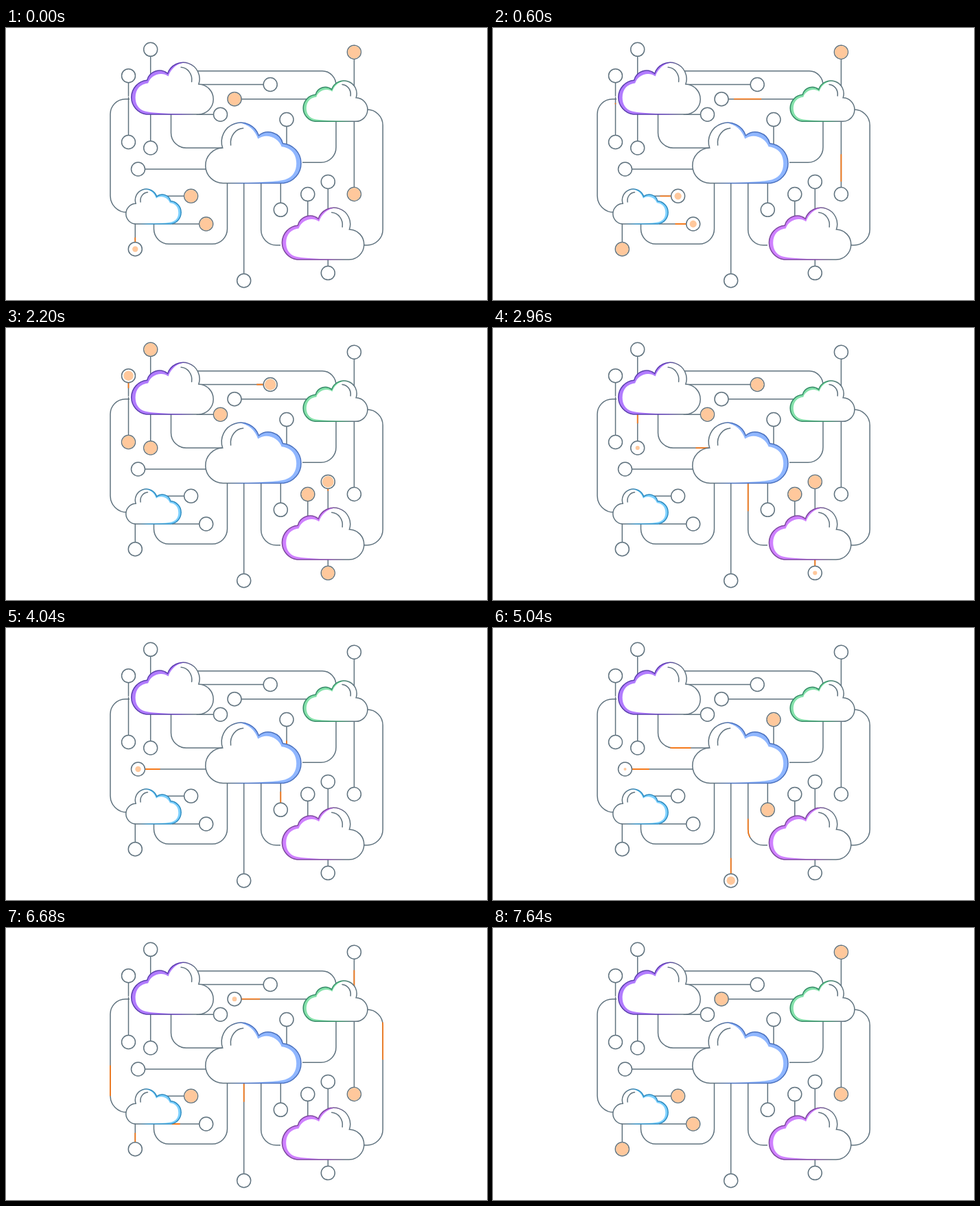
Animation, 701 px wide and 397 px high, one loop 7.68 s. Source, as an HTML page:

```html
<!DOCTYPE html>
<html lang="en">
<head>
<meta charset="utf-8">
<title>Connected clouds</title>
<style>
  html, body { margin: 0; width: 100%; height: 100%; overflow: hidden; background: #fff; }
  svg { display: block; width: 701px; height: 397px; }
  path, circle { fill: none; stroke: #60737f; stroke-width: 1.5; }
  .pulse { stroke: #f5791a; stroke-width: 1.8; }
  .dot { fill: #ffc89c; stroke: none; }
  .flat { stroke: none; }
  .edge { vector-effect: non-scaling-stroke; }
</style>
</head>
<body>
<svg viewBox="0 0 701 397"><defs></defs><g id="lines"></g><g id="pulses"></g><g id="clouds"></g><g id="nodes"></g></svg>
<script>
const LOOP = 7680;
const GROW = 225;    // time for a dot to fill or empty
const SPEED = 0.16;  // px per ms of a returning pulse
const RING = 10;

const layer = id => document.getElementById(id);
const defs = document.querySelector('defs');

function add(parent, tag, attrs) {
  const el = document.createElementNS('http://www.w3.org/2000/svg', tag);
  for (const k in attrs) el.setAttribute(k, attrs[k]);
  parent.appendChild(el);
  return el;
}

const clamp = v => Math.max(0, Math.min(1, v));
const easeOut = p => 1 - (1 - p) * (1 - p);
const easeBoth = p => p < 0.5 ? 2 * p * p : 1 - 2 * (1 - p) * (1 - p);

// Clouds: one shape, scaled and mirrored
const CLOUD = 'M25 76.5A25 25 0 0 1 26 26.8A18.6 18.6 0 0 1 56 17' +
  'A23.6 23.6 0 0 1 101.2 32.5A22 22 0 0 1 100 76.5Z';
const LIGHT = 'M9 52C9 39 17 32 27.5 31C31 20 46 13 57 21C61 10 69 2 84 .3L124 0V78H106' +
  'C62 75.5 34 75 23 72C13 69 9 61 9 52Z';
const SHINE = 'M75.5 7.8C85 8.5 92.5 17.5 91 29';

add(add(defs, 'clipPath', { id: 'inside' }), 'path', { d: CLOUD });

function cloud(x, y, scale, flip, fill, dark) {
  const id = 'edge' + x;
  const grad = add(defs, 'linearGradient', { id });
  add(grad, 'stop', { offset: 0.58, 'stop-color': dark });
  add(grad, 'stop', { offset: 0.78, 'stop-color': '#60737f' });
  const g = add(layer('clouds'), 'g', {
    transform: `translate(${x} ${y}) scale(${flip ? -scale : scale} ${scale})`
  });
  add(g, 'path', { d: CLOUD, class: 'flat', style: 'fill:' + fill });
  add(g, 'path', { d: LIGHT, class: 'flat', style: 'fill:#fff', 'clip-path': 'url(#inside)' });
  add(g, 'path', { d: CLOUD, class: 'edge', style: `stroke:url(#${id})` });
  add(g, 'path', { d: SHINE, class: 'edge', 'stroke-linecap': 'round' });
}

cloud(179.6, 49.5, 1, false, '#b17bff', '#5b3fae');
cloud(430.7, 76.3, 0.785, false, '#84e1aa', '#348a66');
cloud(433.7, 137.2, 1.166, true, '#8fb6ff', '#4b72bf');
cloud(257.3, 234.5, 0.673, true, '#7dd0ff', '#2e8cc0');
cloud(399.2, 261.5, 1, false, '#cf80ff', '#7d479f');

function pulse(d) {
  const el = add(layer('pulses'), 'path', { d, class: 'pulse' });
  const length = el.getTotalLength();
  return {
    length,
    show(from, to) {
      from = Math.max(0, from);
      to = Math.min(length, to);
      const on = to - from > 0.05;
      el.style.display = on ? '' : 'none';
      if (on) el.setAttribute('stroke-dasharray', `0 ${from} ${to - from} 9999`);
    }
  };
}

// Links between clouds; each run is [start, duration, lag of the tail, backwards]
const links = [
  { d: 'M481 84A20 21 0 0 0 461 62.7H278', runs: [[606, 731, 190]] },
  { d: 'M526 119A23 23 0 0 1 549.2 142V294A23 23 0 0 1 526 317H520',
    runs: [[676, 731, 144], [6120, 760, 130, true]] },
  { d: 'M176 269A24 24 0 0 1 152 245V126A22 22 0 0 1 174 103.8H180',
    runs: [[560, 810, 81], [6120, 810, 120, true]] },
  { d: 'M240.5 126V153A22 22 0 0 0 262.5 175H320',
    runs: [[2299, 800, 120], [4632, 800, 116, true]] },
  { d: 'M400 317H394A22.5 22.5 0 0 1 371.7 294V225',
    runs: [[2182, 800, 330], [4534, 800, 113, true]] },
  { d: 'M432 196.3H459A22 22 0 0 0 481 174V136', runs: [] },
  { d: 'M322.5 225V293A22 22 0 0 1 300 315.3H238A22 22 0 0 1 215.5 293V286', runs: [] }
];

for (const link of links) {
  add(layer('lines'), 'path', { d: link.d });
  link.pulse = pulse(link.d);
}

function drawLink({ pulse, runs }, t) {
  const run = runs.find(([start, dur, lag]) => t >= start && t < start + dur + lag);
  if (!run) return pulse.show(0, 0);
  const [start, dur, lag, back] = run;
  const len = pulse.length;
  const head = len * easeBoth(clamp((t - start) / dur));
  const tail = len * easeBoth(clamp((t - start - lag) / dur));
  back ? pulse.show(len - head, len - tail) : pulse.show(tail, head);
}

// Spokes: centre of the ring, direction and distance to the cloud, fill and empty times.
// tail: start of the outgoing tail, back: start of the return (both relative)
const DIR = { L: [-1, 0], R: [1, 0], U: [0, -1], D: [0, 1] };
const spokes = [];

function spoke(x, y, dir, reach, on, off, { tail = -200, back = 0, again } = {}) {
  const [dx, dy] = DIR[dir];
  const d = `M${x + dx * RING} ${y + dy * RING}L${x + dx * reach} ${y + dy * reach}`;
  add(layer('lines'), 'path', { d });
  const ring = add(layer('nodes'), 'circle', { cx: x, cy: y, r: RING, style: 'fill:#fff' });
  const dot = add(layer('nodes'), 'circle', { cx: x, cy: y, r: 0, class: 'dot' });
  const spans = on > off ? [[-LOOP, off], [on, 2 * LOOP]] : [[on, off]];
  if (again) spans.push([again, 2 * LOOP]);
  spokes.push({ pulse: pulse(d), ring, dot, spans, tail, back });
}

// upper violet
spoke(178.5, 69.7, 'D', 30, 1750, 2150);
spoke(178.5, 166.5, 'U', 66, 1050, 2210, { tail: -500 });
spoke(210.7, 31.3, 'D', 38, 1720, 2480);
spoke(210.7, 175, 'U', 49, 1800, 2810, { back: -260 });
spoke(385.2, 82.5, 'L', 100, 2000, 3250, { back: -50 });
spoke(312.5, 126.2, 'L', 35, 1900, 3050);
// green
spoke(507.4, 35.2, 'D', 50, 7000, 700, { back: 31 });
spoke(507.4, 242.5, 'U', 106, 6251, 300, { tail: -438 });
spoke(333, 103.7, 'R', 106, 6600, 300);
// small blue
spoke(269.6, 245.3, 'L', 38, 6240, 500, { tail: -327 });
spoke(291.7, 286, 'L', 50, 7100, 500);
spoke(188.3, 322.7, 'U', 38, -100, 700, { again: 6700 });
// middle
spoke(192.5, 206, 'R', 99, 3940, 4865, { back: 19 });
spoke(346.7, 368.7, 'U', 143, 4890, 5815, { back: -40 });
spoke(400.3, 265.3, 'U', 39, 4093, 5630);
spoke(409, 133.6, 'D', 36, 4490, 5760);
// lower violet
spoke(439.8, 242.6, 'D', 36, 1900, 3100);
spoke(469.3, 224.4, 'D', 40, 2000, 3250);
spoke(469.3, 357.6, 'U', 20, 1800, 2810);

function drawSpoke({ pulse, dot, spans, tail, back }, t) {
  const len = pulse.length;
  let size = 0, from = 0, to = 0;
  for (const [on, off] of spans) {
    size = Math.max(size, Math.min(clamp((t - on) / GROW), clamp((off + GROW - t) / GROW)));
    if (t > on - 500 && t < on + 400) {
      const head = easeOut(clamp((t - on + 500) / 500));
      const end = easeOut(clamp((t - on - tail) / 600));
      from = len * (1 - head);
      to = len * (1 - end);
    } else if (t > off + back) {
      to = (t - off - back) * SPEED;
      from = to - 250 * SPEED;
    }
  }
  dot.setAttribute('r', 9.3 * size);
  pulse.show(from, to);
}

const begin = performance.now();
function frame() {
  const t = (performance.now() - begin) % LOOP;
  for (const l of links) drawLink(l, t);
  for (const s of spokes) drawSpoke(s, t);
  requestAnimationFrame(frame);
}
frame();
</script>
</body>
</html>
```
